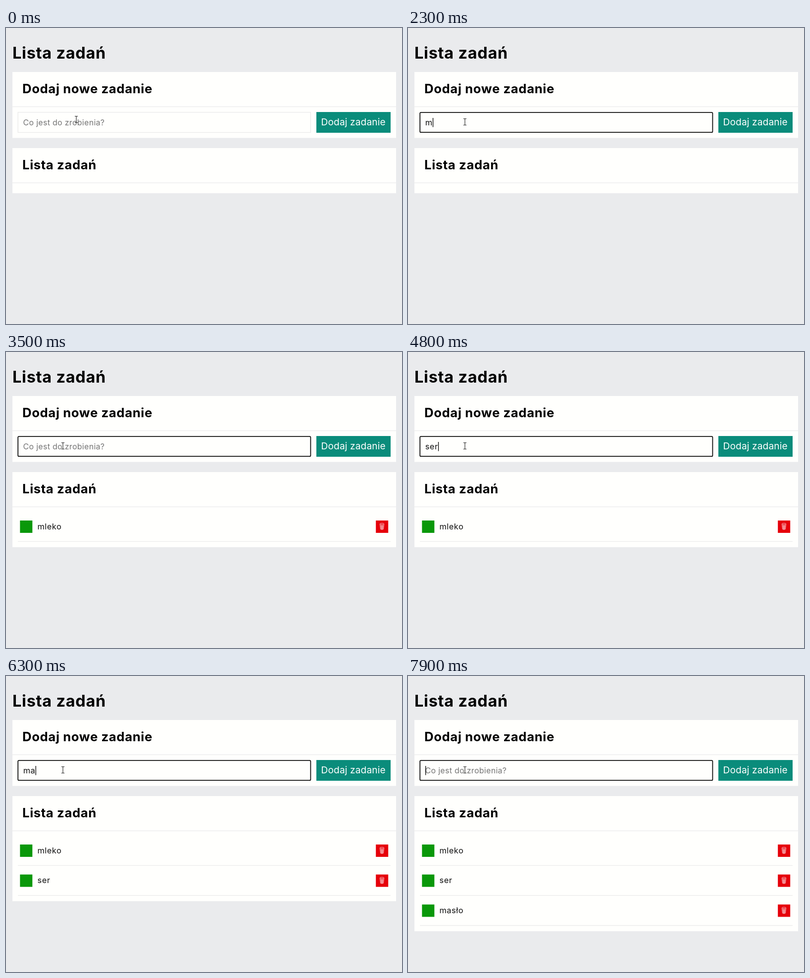
Write an HTML page that moves like this. It is 800 by 599 pixels and loops after 8 s.

```html
<!DOCTYPE html>
<html lang="pl">
<head>
<meta charset="utf-8">
<title>Lista zadań</title>
<style>
  html, body { margin: 0; width: 100%; height: 100%; overflow: hidden; background: #eaebed; }
  svg { display: block; width: 100vw; height: 100vh; font-family: Inter, "Open Sans", sans-serif; }
  .panel { fill: #fffffd; }
  .rule { fill: #ececec; }
  h1, .h1, .h2 { font-weight: 700; letter-spacing: .024em; }
  .h1 { font-size: 32.4px; }
  .h2 { font-size: 25.7px; }
  .hint { font-size: 16px; letter-spacing: .018em; fill: #757575; }
  .body { font-size: 16.4px; letter-spacing: .03em; fill: #111; }
  .label { font-size: 19.2px; letter-spacing: .005em; fill: #fff; }
</style>
</head>
<body>
<svg viewBox="0 0 800 599">
  <defs>
    <g id="bin" fill="none" stroke="#fff" stroke-width=".8" stroke-opacity=".85">
      <ellipse cx="759.5" cy="347.8" rx="4.2" ry="1.3"/>
      <path d="M755.4 348.2L756.6 358.6Q759.5 360 762.4 358.6L763.6 348.2M757.6 349.4L758.2 359M759.5 349.6V359.3M761.4 349.4L760.8 359M756 352.2Q759.5 353.6 763 352.2M756.4 355.4Q759.5 356.8 762.6 355.4"/>
    </g>
  </defs>
  <rect width="800" height="599" fill="#eaebed"/>
  <text class="h1" x="13" y="62">Lista zadań</text>

  <rect class="panel" x="13" y="89" width="775" height="133.5"/>
  <text class="h2" x="33" y="132">Dodaj nowe zadanie</text>
  <rect class="rule" x="13" y="158.7" width="775" height="1.3"/>
  <rect id="field" fill="#fffffd"/>
  <text id="hint" class="hint" x="34.5" y="197">Co jest do zrobienia?</text>
  <text id="typed" class="body" x="34.7" y="197"></text>
  <rect id="caret" y="182" width="1.3" height="18.5"/>
  <rect id="button" x="627" y="170" width="150" height="42"/>
  <text class="label" x="636.5" y="197">Dodaj zadanie</text>

  <rect id="list" class="panel" x="13" y="243" width="775"/>
  <text class="h2" x="33" y="286">Lista zadań</text>
  <rect class="rule" x="13" y="312.7" width="775" height="1.3"/>
  <g id="rows"></g>

  <path id="beam" fill="none" stroke="#222" stroke-width="1.1" d="M-3 -6.5H-1L0 -5.7L1 -6.5H3M0 -5.7V5.7M-3 6.5H-1L0 5.7L1 6.5H3"/>
  <path id="hand" fill="#fff" stroke="#111" stroke-linejoin="round" d="M-1.5 7V-5Q0 -7 1.5 -5V0L6.5 1.2Q8 2 7.8 5L6.5 11H-1L-5.5 4.5Q-5 2.5 -3 4Z"/>
</svg>
<script>
const LOOP = 8000, STEP = 100, ROW = 60.7;
const $ = id => document.getElementById(id);
const items = ["mleko", "ser", "masło"];

// time, text in the field, caret shown, items listed
const states = [
  [0, "", 0, 0], [800, "", 1, 0],
  [1400, "m", 0, 0], [2300, "m", 1, 0], [2400, "mle", 1, 0], [2500, "mlek", 1, 0], [2800, "mleko", 1, 0],
  [3300, "", 0, 1], [3600, "", 1, 1],
  [3900, "s", 1, 1], [4200, "se", 1, 1], [4600, "ser", 1, 1],
  [5300, "", 0, 2], [5400, "", 1, 2],
  [5500, "m", 1, 2], [6300, "ma", 1, 2], [6700, "mas", 1, 2], [7100, "masł", 1, 2], [7400, "masło", 1, 2],
  [7700, "", 0, 3], [7900, "", 1, 3]
];

// time, x, y of the pointer
const path = [[0, 142, 185], [100, 175, 185], [300, 480, 188], [500, 690, 195], [600, 690, 195],
  [700, 300, 196], [800, 120, 195], [1200, 115, 190], [LOOP, 115, 190]];

$("rows").innerHTML = items.map((name, i) => `
  <g transform="translate(0 ${i * ROW})">
    <rect x="28.3" y="341" width="25" height="25" fill="#0a980a"/>
    <text class="body" x="63.5" y="358.8">${name}</text>
    <rect x="747.2" y="341" width="25" height="25" fill="#e6000a"/>
    <use href="#bin"/>
    <rect class="rule" x="24" y="382.8" width="753" height="1.3"/>
  </g>`).join("");

function set(el, attrs) {
  for (const key in attrs) el.setAttribute(key, attrs[key]);
}

function show(el, on) {
  el.style.display = on ? "" : "none";
}

function pointerAt(t) {
  const i = path.findIndex(p => p[0] > t);
  const [t0, x0, y0] = path[i - 1], [t1, x1, y1] = path[i];
  const k = (t - t0) / (t1 - t0);
  return [x0 + (x1 - x0) * k, y0 + (y1 - y0) * k];
}

function drawField(focused) {
  set($("field"), focused
    ? { x: 24.2, y: 170.8, width: 591.2, height: 40.4, rx: 2, stroke: "#101010", "stroke-width": 1.8 }
    : { x: 24.2, y: 170.6, width: 591.2, height: 40.8, rx: 0, stroke: "#ebebeb", "stroke-width": 1.4 });
}

function render(time) {
  const t = Math.floor(time / STEP) * STEP;
  const [, text, caret, count] = states.filter(s => s[0] <= t).pop();

  drawField(t >= 800);
  show($("hint"), !text);
  $("typed").textContent = text;
  show($("caret"), caret);
  set($("caret"), { x: text ? 35 + $("typed").getComputedTextLength() : 35 });

  set($("list"), { height: 91.3 + count * ROW });
  [...$("rows").children].forEach((row, i) => show(row, i < count));

  const [x, y] = pointerAt(t);
  const hover = x > 627;
  set($("button"), { fill: hover ? "#0a9e8c" : "#0a8c7b" });
  for (const id of ["beam", "hand"]) {
    set($(id), { transform: `translate(${x} ${y})` });
    show($(id), (id === "hand") === hover);
  }
}

const start = performance.now();
function tick() {
  render((performance.now() - start) % LOOP);
  requestAnimationFrame(tick);
}
tick();
</script>
</body>
</html>
```
